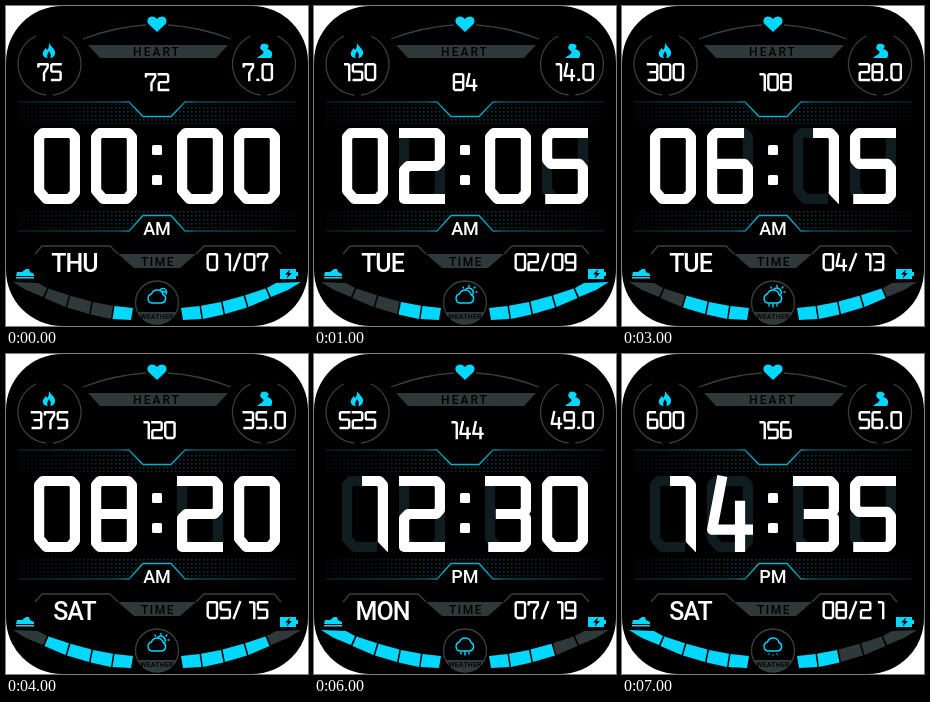
These frames come from a looping animation (302 by 320 pixels, 8000 ms). An HTML page:

```html
<!DOCTYPE html>
<html lang="en">
<head>
<meta charset="utf-8">
<title>Watch face</title>
<style>
  html, body { margin: 0; width: 100%; height: 100%; overflow: hidden; background: #fff; }
  svg { display: block; width: 302px; height: 320px; }
  text { font-family: Roboto, "Liberation Sans", sans-serif; text-anchor: middle; }
  .cyan { fill: #00d8ff; }
  .plate { fill: #2f3939; }
  .rim { fill: none; stroke: #364040; stroke-width: 1.3; }
  .ink { fill: none; stroke: #fff; stroke-linejoin: round; stroke-linecap: square; }
  .ghost { fill: none; stroke: #101d20; stroke-linejoin: round; }
  .word { fill: #fff; font-weight: 500; }
  .icon { fill: none; stroke: #00d8ff; stroke-width: 1.4; stroke-linecap: round; stroke-linejoin: round; }
  .label { fill: #000; font-weight: 500; }
</style>
</head>
<body>
<svg viewBox="0 0 302 320">
  <defs>
    <pattern id="dots" width="4" height="4" patternUnits="userSpaceOnUse">
      <rect x="1" y="1" width="1.5" height="1.5" fill="#113740"/>
    </pattern>
    <linearGradient id="fade">
      <stop offset="0" stop-color="#fff" stop-opacity=".25"/>
      <stop offset=".35" stop-color="#fff"/>
      <stop offset=".65" stop-color="#fff"/>
      <stop offset="1" stop-color="#fff" stop-opacity=".25"/>
    </linearGradient>
    <linearGradient id="edge" gradientUnits="userSpaceOnUse" x1="12" x2="290" y1="0" y2="0">
      <stop offset="0" stop-color="#0a1c20"/>
      <stop offset=".36" stop-color="#0e4a56"/>
      <stop offset=".43" stop-color="#00b0cf"/>
      <stop offset=".57" stop-color="#00b0cf"/>
      <stop offset=".64" stop-color="#0e4a56"/>
      <stop offset="1" stop-color="#0a1c20"/>
    </linearGradient>
    <mask id="band" maskUnits="userSpaceOnUse" x="0" y="90" width="302" height="145">
      <rect x="12" y="90" width="278" height="145" fill="url(#fade)"/>
    </mask>
    <clipPath id="lens"><circle cx="151" cy="296.500" r="21.500"/></clipPath>
  </defs>

  <rect width="302" height="320" rx="56"/>

  <path class="rim" d="M77 33Q108 21 140 19M162 19Q194 21 225 33"/>
  <path class="cyan" d="M151 26L142.500 18C139 13 145 7 151 13C157 7 163 13 159.500 18Z"/>
  <path class="plate" d="M82 39H222L210 52H94Z"/>
  <text class="label" x="151" y="50" font-size="12" letter-spacing="2">HEART</text>

  <path id="dial" class="rim" d="M30 30A31 31 0 0 0 40 89M47 89A31 31 0 0 0 57 30"/>
  <use href="#dial" x="214.500"/>
  <path class="cyan" d="M43 37C45 41 50 43 49 48C48 51 46 52 44 52C46 49 44 47 43 45C42 48 40 49 42 52C38 52 36 49 37 46C38 44 39 44 39 42C40 43 41 43 41 44C43 42 43 40 43 37Z"/>
  <path class="cyan" d="M256 38C261 37 265 40 261 43C267 44 267 49 265 52H251C254 49 259 48 257 45C253 43 254 40 256 38Z"/>

  <g mask="url(#band)" fill="url(#dots)">
    <path d="M12 98H122L137 112H165L180 98H290V118H12Z"/>
    <path d="M12 224H122L137 209H165L180 224H290V204H12Z"/>
  </g>
  <path d="M12 96H123L137 110.500H165L179 96H290M12 225H123L137 209.500H165L179 225H290"
    fill="none" stroke="url(#edge)" stroke-width="1.3"/>

  <g id="ghosts"></g>
  <g id="clock"></g>
  <g fill="#fff">
    <rect x="146" y="139" width="10" height="10" rx="1.500"/>
    <rect x="146" y="169" width="10" height="10" rx="1.500"/>
  </g>

  <text id="half" class="word" x="151" y="229" font-size="18"></text>
  <path class="rim" d="M29 248L36 240H104L112 248M190 248L198 240H268L275 248"/>
  <path class="plate" d="M112 248H190L174 262H128Z"/>
  <text class="label" x="152" y="259.500" font-size="12" letter-spacing="1.500">TIME</text>
  <text id="day" class="word" x="68.500" y="265.500" font-size="25" letter-spacing="-1"></text>
  <g id="small"></g>

  <path class="cyan" d="M11 266H16L20 263H23L24 266L28 268V270H10ZM10 271H28V272.500H10Z"/>
  <path class="cyan" d="M274 263H290V266H292V270H290V273H274Z"/>
  <path d="M284 263.500L279 268.500H282L280.500 272.500L286 267H283Z"/>

  <g id="steps"></g>
  <g id="power" transform="translate(302) scale(-1 1)"></g>

  <g clip-path="url(#lens)">
    <rect class="plate" x="128" y="306" width="46" height="14"/>
  </g>
  <circle class="rim" cx="151" cy="296.500" r="21.500"/>
  <text class="label" x="151" y="313" font-size="7" letter-spacing=".2">WEATHER</text>
  <path id="weather" class="icon"/>
</svg>
<script>
const $ = id => document.getElementById(id);

// Centre lines on a 10 by 16 grid
const glyphs = {
  0: 'M1 0 L9 0 L10 1 L10 14.5 L8.5 16 L2 16 L0 14 L0 1 Z',
  1: 'M5.6 0 L9 0 L10 1 L10 16',
  2: 'M0 0 L9 0 L10 1 L10 7 L9 8 L1.2 8 L0 9 L0 16 L10 16',
  3: 'M0 0 L9 0 L10 1 L10 7 L9 8 L3 8 M9 8 L10 9 L10 15 L9 16 L.9 16',
  4: 'M2.6 0 L0 11.8 L10 11.8 M7.8 6 L7.8 16',
  5: 'M10 0 L1 0 L0 1 L0 6.5 L1 7.5 L9 7.5 L10 8.5 L10 15 L9 16 L.9 16',
  6: 'M7.5 0 L1 0 L0 1 L0 15 L1 16 L9 16 L10 15 L10 8.5 L9 7.5 L0 7.5',
  7: 'M0 2 L0 0 L10 0 L10 3 L6 9 L6 16',
  8: 'M1 0 L9 0 L10 1 L10 15 L9 16 L1 16 L0 15 L0 1 Z M0 8 L10 8',
  9: 'M10 8.5 L1 8.5 L0 7.5 L0 1 L1 0 L9 0 L10 1 L10 15 L9 16 L1 16',
  '/': 'M.5 16 L7 0',
  '.': 'M1 15.8 L1.6 15.8'
};

function glyph(ch, x, y, w, h, weight, cls = 'ink') {
  const d = glyphs[ch].replace(/([ML])([\d.]+) ([\d.]+)/g,
    (_, op, px, py) => `${op}${x + px * w / 10} ${y + py * h / 16}`);
  return `<path class="${cls}" stroke-width="${weight}" d="${d}"/>`;
}

const big = (ch, x, cls) => glyph(ch, x + 5.1, 127, 35.8, 66, 10.2, cls) +
  (ch === '1' && !cls ? `<path d="M${x + 35} 187L${x + 46.5} 199H${x + 35}Z"/>` : '');

const advance = ch => ch === '.' ? 6 : ch === '/' ? 11.5 : 12.9;

function number(text, x, y, centred) {
  const chars = [...text];
  if (centred) x -= chars.reduce((sum, ch) => sum + advance(ch), 0) / 2 - .6;
  const out = chars.map(ch => {
    const part = glyph(ch, x + 1.2, y + 1.2, 9.3, 15.8, 2.4);
    x += advance(ch);
    return part;
  });
  return `<g role="img" aria-label="${text}">${out.join('')}</g>`;
}

// Gauge pieces, from the middle outwards
const pieces = [
  '108.500 300 127 302 125 314 106.500 313',
  '87 296 107 299.700 105 313 84.500 308.500',
  '64.500 289.800 85.500 295.500 83 308 61 301.500',
  '42.500 282.500 63 289.300 59.500 301 38.500 292',
  '7 276 32 277 41 282 37 291 20 284'
];
const gauge = level => pieces.map((p, i) =>
  `<polygon points="${p}" class="${i < level ? 'cyan' : 'plate'}"/>`).join('');

const cloud = 'M146 297H156A4.500 4.500 0 0 0 157 288.500A6 6 0 0 0 145.500 288A4.600 4.600 0 0 0 146 297';
const moon = 'M154 284A3.500 3.500 0 1 1 160 288M156.500 285Q158 287 159.500 285.500';
const sun = 'M152 283A4.500 4.500 0 0 1 159 288M155 279.500V280.500M160 282L161 281M162 286H163M149 281L149.500 282';
const rain = 'M147 298.500V300M151 297.500V301M155 298.500V300';
const snow = 'M147 300H147.100M151 301H151.100M155 300H155.100';
const skies = [cloud + moon, cloud + sun, cloud + sun + rain, cloud + sun + rain,
  cloud + sun, cloud, cloud + rain, cloud + snow];

const days = ['THU', 'TUE', 'THU', 'TUE', 'SAT', 'THU', 'MON', 'SAT'];
const cells = [28, 85, 171, 228];
const pad = n => String(n).padStart(2, '0');

$('ghosts').innerHTML = cells.map(x => big('0', x, 'ghost')).join('');

function show(n) {
  const time = pad(n * 2) + pad(n * 5);
  $('clock').innerHTML = cells.map((x, i) => big(time[i], x)).join('');
  $('small').innerHTML =
    number(String(75 * (n + 1)), 43.5, 57, true) +
    number(String(72 + 12 * n), 151, 67, true) +
    number((7 * (n + 1)).toFixed(1), 236.5, 57) +
    number(`${pad(n + 1)}/${pad(7 + 2 * n)}`, 200.5, 247);
  $('half').textContent = n < 6 ? 'AM' : 'PM';
  $('day').textContent = days[n];
  $('steps').innerHTML = gauge(Math.ceil((n + 1) * 5 / 8));
  $('power').innerHTML = gauge(Math.min(5, 5 - Math.floor((n - 1) / 2)));
  $('weather').setAttribute('d', skies[n]);
}

let shown = -1;
function tick() {
  const n = Math.floor(performance.now() / 1000) % 8;
  if (n !== shown) show(shown = n);
  requestAnimationFrame(tick);
}
tick();
</script>
</body>
</html>
```
